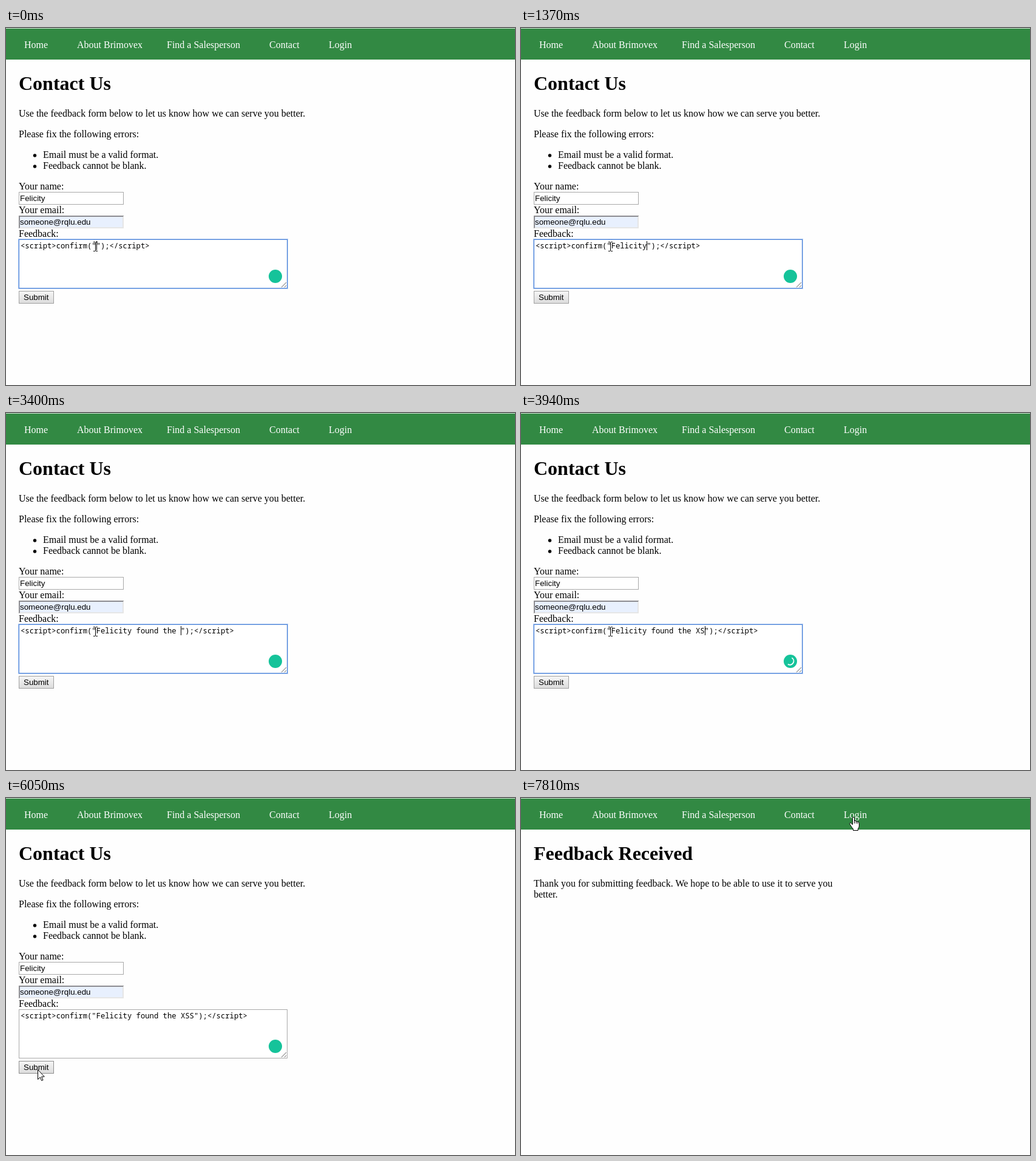
An HTML page for the animation above (8000 ms loop, 839 by 588 pixels).

```html
<!DOCTYPE html>
<html lang="en">
<head>
<meta charset="utf-8">
<title>Contact form</title>
<style>
html, body { margin: 0; width: 100%; height: 100%; overflow: hidden; background: #fefefe; }
svg { display: block; width: 839px; height: 588px; }
text { white-space: pre; }
.serif { font: 16px "Liberation Serif", serif; }
.title { font: bold 32px "Liberation Serif", serif; }
.field { font: 13.333px "Liberation Sans", sans-serif; }
.code { font: 12.22px "Noto Sans Mono", monospace; }
.nav { fill: #fff; }
.crisp { shape-rendering: crispEdges; }
</style>
</head>
<body>
<svg viewBox="0 0 839 588">
  <defs>
    <linearGradient id="face" x1="0" y1="0" x2="0" y2="1">
      <stop offset="0" stop-color="#f6f6f6"/>
      <stop offset="1" stop-color="#dcdcdc"/>
    </linearGradient>
  </defs>
  <rect width="839" height="588" fill="#fefefe"/>
  <rect class="crisp" y="1" width="839" height="51" fill="#328943"/>
  <rect class="crisp" y="0" width="839" height="1" fill="#d9e8dc"/>
  <g class="serif nav">
    <text x="30" y="33">Home</text>
    <text x="117" y="33">About Brimovex</text>
    <text x="265" y="33">Find a Salesperson</text>
    <text x="434" y="33">Contact</text>
    <text x="532" y="33">Login</text>
  </g>

  <g id="form">
    <text class="title" x="21" y="102">Contact Us</text>
    <g class="serif">
      <text x="21" y="146">Use the feedback form below to let us know how we can serve you better.</text>
      <text x="21" y="180">Please fix the following errors:</text>
      <text x="61" y="214">Email must be a valid format.</text>
      <text x="61" y="232">Feedback cannot be blank.</text>
      <text x="21" y="266">Your name:</text>
      <text x="21" y="305">Your email:</text>
      <text x="21" y="344">Feedback:</text>
    </g>
    <circle cx="47.5" cy="210" r="2.7"/>
    <circle cx="47.5" cy="228" r="2.7"/>

    <rect class="crisp" x="21.5" y="270.5" width="172" height="20" fill="#fff" stroke="#a9a9a9"/>
    <g class="crisp">
      <rect x="21" y="309" width="173" height="21" fill="#e8f0fe"/>
      <path d="M21 330V309H194L192 311H23V328Z" fill="#8c8c90"/>
      <path d="M21 330H194V309L192 311V328H23Z" fill="#e6e6e6"/>
    </g>
    <text class="field" x="23" y="285">Felicity</text>
    <text class="field" x="23" y="324">someone@rqlu.edu</text>

    <rect id="area" class="crisp" x="21.5" y="348.5" width="442" height="80" fill="#fff"/>
    <rect id="glow" class="crisp" x="20.5" y="347.5" width="444" height="82" fill="none" stroke="#a6c3f0"/>
    <path d="M454 427L462 419M459 427L462 424" stroke="#666" fill="none"/>
    <text id="code" class="code" x="24" y="363"></text>
    <rect id="caret" class="crisp" y="351" width="1" height="15"/>
    <circle cx="444" cy="409" r="11" fill="#15c39a"/>
    <path id="spinner" d="M447 403.6A6.2 6.2 0 0 1 440.5 414.1" fill="none" stroke="#fff" stroke-width="1.8" stroke-linecap="round"/>

    <rect id="button" class="crisp" x="21.5" y="433.5" width="57" height="20" fill="url(#face)" stroke="#a0a0a0"/>
    <text class="field" x="29" y="448">Submit</text>
  </g>

  <g id="thanks">
    <text class="title" x="21" y="102">Feedback Received</text>
    <text class="serif" x="21" y="146">Thank you for submitting feedback. We hope to be able to use it to serve you</text>
    <text class="serif" x="21" y="164">better.</text>
  </g>

  <path id="beam" class="crisp" d="M144 352.5H147M148 352.5H151M147.5 353V367M144 367.5H147M148 367.5H151" stroke="#000" fill="none"/>
  <path id="arrow" d="M.5 .5V16.5L4.3 12.9L6.7 18.5L9 17.5L6.6 12H11.3Z" fill="#fff" stroke="#000"/>
  <g id="hand" transform="translate(541 31)">
    <path d="M5.5 13V2.2Q5.5 .5 7 .5T8.5 2.2V7.5Q8.7 6 10 6.2T11.4 8Q11.7 6.8 12.8 7.1T14 9Q14.6 8 15.6 8.6T16.4 10.5V15Q16.4 17.5 14.5 19.5V22.5H6.5V20Q4.5 18 3.3 15.6L1 12.2Q.2 10.7 1.4 10.1T3.5 10.8Z" fill="#fff" stroke="#000"/>
    <path d="M8.5 7.5V11M11.4 8V11M14 9V11.5" stroke="#000" fill="none"/>
  </g>
</svg>
<script>
const LOOP = 8000, CHAR = 7.332;
const OPEN = '<script>confirm("', CLOSE = '");<\/script>';
const MESSAGE = "Felicity found the XSS";

// [time, characters typed]
const typing = [
  [0, 0], [310, 1], [440, 2], [580, 3], [720, 4], [850, 5], [1120, 7], [1370, 8],
  [1680, 9], [1800, 10], [1930, 11], [2060, 13], [2190, 14], [2310, 15],
  [2440, 16], [2580, 17], [2710, 18], [2860, 19], [3820, 20], [3940, 21], [4090, 22]
];

// [time, x, y] of the arrow tip
const moves = [
  [5110, 36, 509], [5230, 36, 520], [5370, 38, 505], [5500, 43, 480],
  [5640, 49, 456], [5780, 52, 447], [6450, 75, 436], [6590, 170, 372],
  [6730, 305, 262], [6870, 435, 140], [7010, 525, 58], [7140, 546, 36]
];

const el = Object.fromEntries([...document.querySelectorAll("[id]")].map(n => [n.id, n]));
const last = (list, t) => list.filter(k => k[0] <= t).pop();
const within = (t, a, b) => t >= a && t < b;
const show = (node, on) => node.style.display = on ? "" : "none";

function draw(t) {
  const typed = last(typing, t)[1];
  const focused = t < 5910;
  const pressed = within(t, 5910, 6050);
  const sent = t >= 7680;

  show(el.form, !sent);
  show(el.thanks, sent);

  el.code.textContent = OPEN + MESSAGE.slice(0, typed) + CLOSE;
  el.caret.setAttribute("x", Math.round(24 + (OPEN.length + typed) * CHAR));
  show(el.caret, t < 4650 || within(t, 5230, 5640));
  el.area.setAttribute("stroke", focused ? "#4d84d8" : "#a9a9a9");
  show(el.glow, focused);
  el.button.setAttribute("fill", pressed ? "#d6d6d6" : "url(#face)");
  el.button.setAttribute("stroke", t >= 5780 ? "#8e8e8e" : "#a0a0a0");

  show(el.spinner, within(t, 2060, 3260) || within(t, 3680, 4090));
  const turn = Math.floor((t - 2310) / 130) * 60;
  el.spinner.setAttribute("transform", `rotate(${turn} 444 409)`);

  show(el.beam, t < 5110);
  show(el.arrow, within(t, 5110, 7420));
  show(el.hand, t >= 7420);
  const tip = last(moves, t);
  if (tip) el.arrow.setAttribute("transform", `translate(${tip[1]} ${tip[2]})`);
}

const start = performance.now();
function tick() {
  draw((performance.now() - start) % LOOP);
  requestAnimationFrame(tick);
}
draw(0);
requestAnimationFrame(tick);
</script>
</body>
</html>
```
